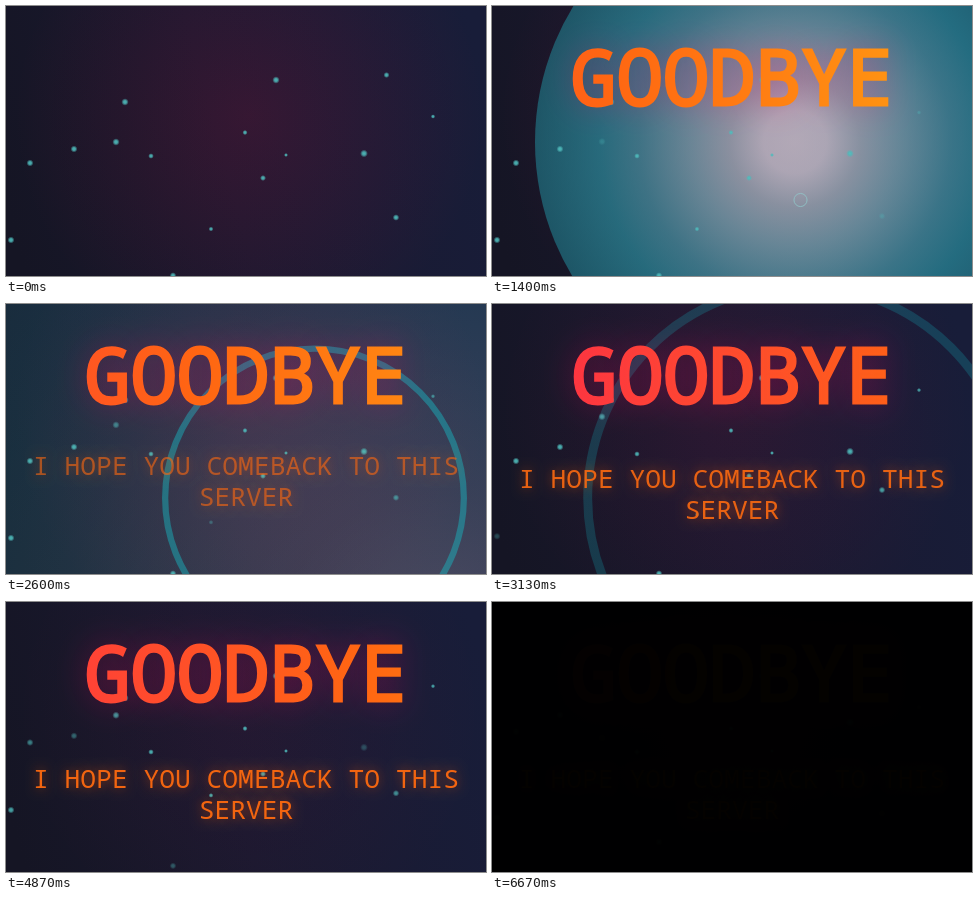
Recreate the animation shown at these times as an HTML page with a canvas. Size 480 px wide and 270 px high, loop 6.87 s.

```html
<!DOCTYPE html>
<html lang="en">
<head>
<meta charset="utf-8">
<title>Goodbye</title>
<style>
html, body { margin: 0; width: 100%; height: 100%; overflow: hidden; background: #000; }
canvas { display: block; }
</style>
</head>
<body>
<canvas id="stage" width="480" height="270"></canvas>
<script>
const ctx = document.getElementById('stage').getContext('2d');
const W = 480, H = 270, LOOP = 6870, STEP = 1000 / 15, LAST = 100;
const FONT = '"Noto Sans Mono", "DejaVu Sans Mono", monospace';

// x, y, radius, start of floating (ms), half period (ms)
const DOTS = [
  [5, 234, 2.7, 2730], [24, 157, 2.7, 3390], [68, 143, 2.7, 3850],
  [110, 136, 2.9, 1210], [119, 96, 2.9, 9e3], [145, 150, 2, 9e3],
  [167, 269.5, 2.5, 4100], [205, 223, 1.6, 1910], [239, 126.5, 1.8, 9e3],
  [257, 172, 2.2, 9e3], [270, 74, 2.9, 9e3], [280, 149, 1.2, 9e3],
  [358, 147.5, 3.1, 4420], [380.5, 69, 2.2, 9e3], [390, 211.5, 2.5, 1040],
  [427, 110.5, 1.4, 600, 3500]
];

const clamp = x => Math.max(0, Math.min(1, x));
const span = (t, a, b) => clamp((t - a) / (b - a));
const smooth = x => x * x * (3 - 2 * x);
const mix = (a, b, k) => a + (b - a) * k;
const wave = x => smooth(1 - Math.abs(1 - x % 2));

function fill(g, stops) {
  stops.forEach(([at, color]) => g.addColorStop(at, color));
  return g;
}

function background(t) {
  ctx.fillStyle = fill(ctx.createLinearGradient(0, 200, W, 70),
    [[0, '#151524'], [0.45, '#1a1930'], [1, '#181d39']]);
  ctx.fillRect(0, 0, W, H);
  const a = mix(0.14, 0.05, smooth(span(t, 2500, 3700)));
  ctx.fillStyle = fill(ctx.createRadialGradient(243, 110, 0, 243, 110, 235),
    [[0, `rgba(225,10,60,${a})`], [1, 'rgba(225,10,60,0)']]);
  ctx.fillRect(0, 0, W, H);
}

function burst(t, x, y, start) {
  const age = t - start, r = age * 0.65;
  if (age <= 0 || age >= 1200) return;
  ctx.globalAlpha = 1 - age / 1200;
  ctx.fillStyle = fill(ctx.createRadialGradient(x, y, 0, x, y, r), [
    [0, '#f4f0f8'], [0.12, '#ecebf4'], [0.25, '#b8ccd6'], [0.4, '#88bcc8'],
    [0.6, '#4aa0b0'], [0.75, '#2a94a4'], [1, '#207686']]);
  ctx.beginPath();
  ctx.arc(x, y, r, 0, 7);
  ctx.fill();
  ctx.globalAlpha = 1;
}

function ring(t) {
  const age = t - 1345, k = age / 2300, r = age * 0.119;
  if (k <= 0 || k >= 1) return;
  const c = span(k, 0.3, 0.55);
  ctx.strokeStyle = `rgba(${mix(145, 20, c)},${mix(200, 185, c)},${mix(203, 195, c)},${1 - k})`;
  ctx.lineWidth = Math.max(0.8, r * 0.042);
  ctx.beginPath();
  ctx.arc(308.5, 194, r, 0, 7);
  ctx.stroke();
}

function dots(t) {
  for (const [x, y, r, start, half = 2770] of DOTS) {
    const k = t > start ? wave((t - start) / half) : 0;
    const cy = y - 30 * k;
    ctx.globalAlpha = t > start ? mix(0.3, 1, k) : 1;
    ctx.fillStyle = fill(ctx.createRadialGradient(x, cy, 0, x, cy, r + 0.8), [
      [0, 'rgba(78,195,192,.95)'], [0.45, 'rgba(78,185,186,.8)'], [1, 'rgba(78,185,186,0)']]);
    ctx.beginPath();
    ctx.arc(x, cy, r + 0.8, 0, 7);
    ctx.fill();
  }
  ctx.globalAlpha = 1;
}

function titleScale(t) {
  if (t < 2000) return mix(0.8, 1, smooth(span(t, 200, 930)));
  if (t < 3750) return mix(1, 0.932, smooth(span(t, 3000, 3750)));
  if (t < 4300) return mix(0.932, 1.05, smooth(span(t, 3750, 4300)));
  return mix(1.05, 1, smooth(span(t, 4300, 4750)));
}

// The regular face, thickened by an outline in the same gradient.
function title(t) {
  const s = titleScale(t), left = 79 - 644 * wave((t + 100) / 2000);
  const dip = smooth(span(t, 3000, 3750)) * (1 - smooth(span(t, 3850, 4300)));
  ctx.save();
  ctx.globalAlpha = smooth(span(t, 200, 930)) * (1 - 0.1 * dip);
  ctx.translate(240, 72);
  ctx.scale(s, s);
  ctx.font = `76.8px ${FONT}`;
  ctx.textAlign = 'center';
  ctx.lineWidth = 3;
  ctx.shadowColor = 'rgba(255,0,100,.5)';
  ctx.shadowBlur = 30;
  ctx.fillStyle = ctx.strokeStyle = fill(ctx.createLinearGradient(left - 240, 0, left + 726, 0), [
    [0, '#fa1a56'], [0.3, '#ff4038'], [0.6, '#ff6612'], [1, '#ffa212']]);
  ctx.strokeText('GOODBYE', 0, 27);
  ctx.shadowColor = 'transparent';
  ctx.fillText('GOODBYE', 0, 27);
  ctx.restore();
}

function subtitle(t) {
  const k = 1 - (1 - span(t, 1950, 3350)) ** 1.6;
  if (!k) return;
  ctx.save();
  ctx.globalAlpha = k * 0.96;
  ctx.translate(240, -40 * (1 - k));
  ctx.font = `26.3px ${FONT}`;
  ctx.textAlign = 'center';
  ctx.shadowColor = 'rgba(255,90,0,.6)';
  ctx.shadowBlur = 12;
  ctx.fillStyle = '#fa6810';
  ctx.fillText('I HOPE YOU COMEBACK TO THIS', 0, 186);
  ctx.fillText('SERVER', 0, 217);
  ctx.restore();
}

function draw(t) {
  background(t);
  burst(t, 303, 136, 1000);
  burst(t, 430, 343, 1644);
  ring(t);
  dots(t);
  title(t);
  subtitle(t);
  ctx.fillStyle = `rgba(0,0,0,${0.985 * span(t, 6000, 6660)})`;
  ctx.fillRect(0, 0, W, H);
}

// The picture advances 15 times a second, then holds on black.
const begin = performance.now();
function tick() {
  const t = (performance.now() - begin) % LOOP;
  draw(Math.min(LAST, Math.floor((t + 4) / STEP)) * STEP);
  requestAnimationFrame(tick);
}
tick();
</script>
</body>
</html>
```
